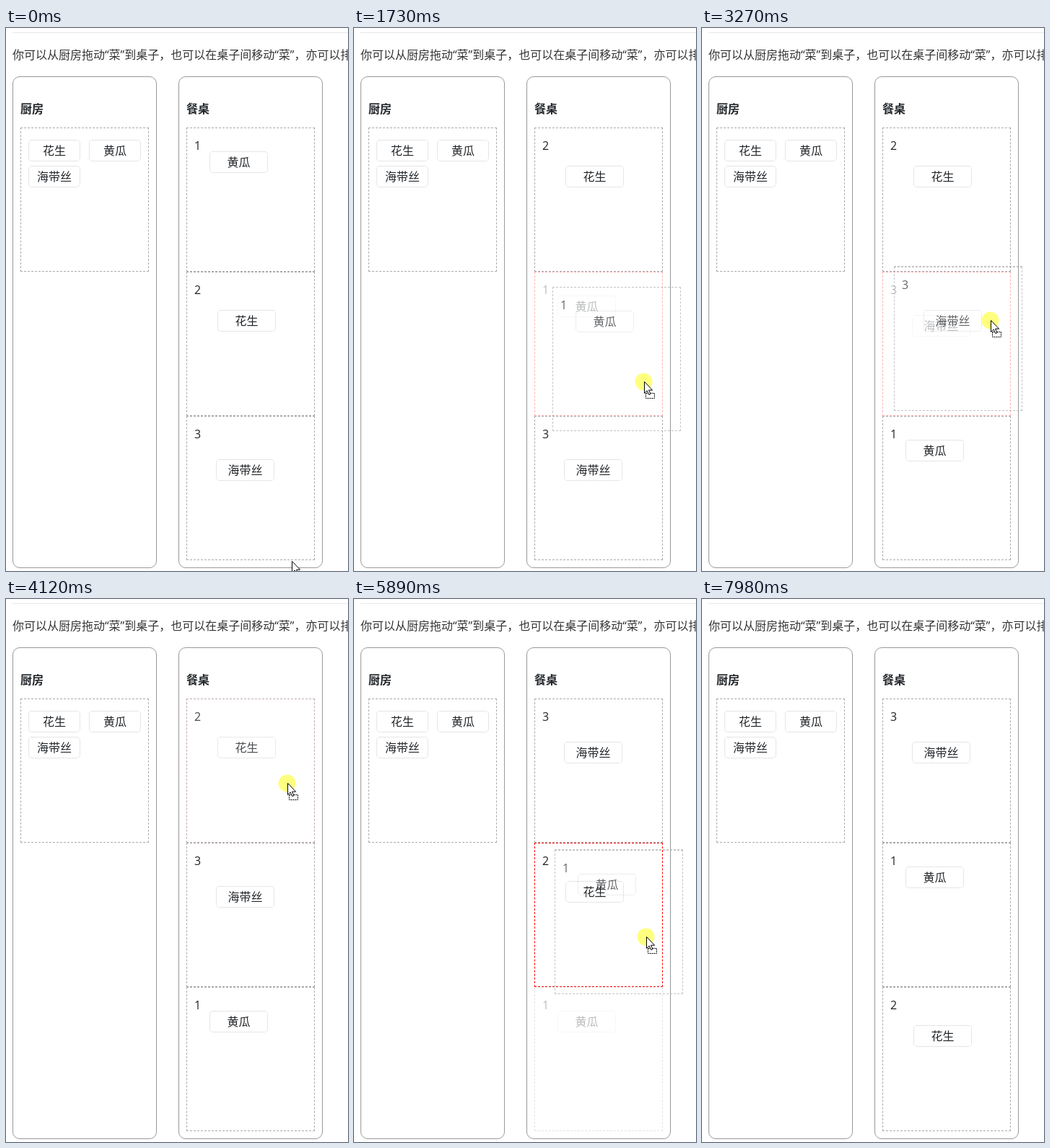
An HTML page that plays this animation: 474 by 753 pixels, repeating every 8.44 s.

```html
<!DOCTYPE html>
<html lang="zh-CN">
<head>
<meta charset="utf-8">
<style>
  html, body { margin: 0; width: 100%; height: 100%; overflow: hidden; background: #fff; }
  body { position: relative; font: 16px/24px "Open Sans", "Noto Sans CJK SC", sans-serif; color: #212529; white-space: nowrap; }
  body * { box-sizing: border-box; }
  div, svg { position: absolute; }
  .rule { left: 9px; right: 0; top: 6px; height: 1px; background: #e8e8e8; }
  .intro { left: 9px; top: 25px; color: #333; }
  .panel { top: 67px; width: 200px; height: 682px; border: 1px solid #999; border-radius: 10px; }
  .panel b { position: absolute; left: 10px; top: 32px; }
  .slot { width: 178px; height: 200px; border: 1px dashed #aaa; }
  .slot span { position: absolute; left: 10px; top: 12px; }
  .dish { width: 81px; height: 30px; line-height: 28px; border: 1px dotted #ccc; border-radius: 5px; text-align: center; }
  .kitchen .dish { width: 72px; }
  .hover { border-color: #f00; }
  .source { opacity: .3; }
  #tables > div, #ghost, #cursor { left: 0; top: 0; }
  #ghost { opacity: .7; }
  /* A lower table also picks up the bottom edge of the table above it */
  #ghost.lower::before { content: ""; position: absolute; inset: -2px -1px auto; border-top: 1px dashed #aaa; }
  #cursor { overflow: visible; }
</style>
</head>
<body>
<div class="rule"></div>
<div class="intro">你可以从厨房拖动“菜”到桌子，也可以在桌子间移动“菜”，亦可以排序</div>
<div class="panel" style="left:9px"><b>厨房</b></div>
<div class="panel" style="left:239px"><b>餐桌</b></div>
<div class="slot kitchen" style="left:20px;top:138px">
  <div class="dish" style="left:10px;top:16px">花生</div>
  <div class="dish" style="left:94px;top:16px">黄瓜</div>
  <div class="dish" style="left:10px;top:52px">海带丝</div>
</div>
<div id="tables">
  <div><span>1</span><div class="dish" style="left:31px;top:32px">黄瓜</div></div>
  <div><span>2</span><div class="dish" style="left:42px;top:52px">花生</div></div>
  <div><span>3</span><div class="dish" style="left:40px;top:59px">海带丝</div></div>
</div>
<div id="ghost"></div>
<svg id="cursor" width="20" height="26">
  <circle id="press" cx="-.5" cy=".5" r="12" fill="#ff0" fill-opacity=".5"/>
  <rect id="parcel" x="2.5" y="16.5" width="12" height="7" fill="#fff" stroke="#000" stroke-dasharray="2 1"/>
  <path d="M.5 .5V16.5L4.2 13L6.8 18.6L9 17.6L6.5 12.2H11.6Z" fill="#fff" stroke="#000"/>
</svg>
<script>
const LOOP = 8440, HIDE_AT = 7980;
const LEFT = 250, TOP = 138, SLOT = 200, MIDDLE = TOP + SLOT * 1.5;
const HOLD = 150, MAX_TRAVEL = 420;

const stop = (time, x, y) => ({ time, x, y });

// Each drag carries a table from an outer slot into the middle one
const drags = [
  { from: 0, grab: stop(580, 377, 269), carry: [stop(1190, 402, 490)], drop: 1880 },
  { from: 2, grab: stop(2340, 384, 612), carry: [stop(3040, 400, 405)], drop: 3420 },
  { from: 0, grab: stop(3970, 390, 255), carry: [stop(4570, 399, 465)], drop: 4970 },
  { from: 2, grab: stop(5430, 377, 658),
    carry: [stop(5890, 405, 468), stop(6750, 400, 440), stop(7050, 398, 388)], drop: 7440 }
];
const route = [stop(0, 396, 739), ...drags.flatMap(d => [d.grab, ...d.carry]), stop(7900, 345, 727)];

const byId = id => document.getElementById(id);
const ghost = byId('ghost'), cursor = byId('cursor'), tables = [...byId('tables').children];

const easeOut = p => p * (2 - p);
const show = (el, on) => { el.style.display = on ? '' : 'none'; };
const place = (el, x, y) => { el.style.transform = `translate(${Math.round(x)}px,${Math.round(y)}px)`; };

function pointerAt(t) {
  const next = route.findIndex(s => s.time > t);
  if (next < 0) return route.at(-1);
  const a = route[next - 1], b = route[next];
  const leave = Math.max(a.time + HOLD, b.time - MAX_TRAVEL);
  const p = easeOut(Math.max(0, (t - leave) / (b.time - leave)));
  return { x: a.x + (b.x - a.x) * p, y: a.y + (b.y - a.y) * p };
}

function render(t) {
  const pointer = pointerAt(t);
  const order = [0, 1, 2];
  let active = null, dragged = -1;

  for (const drag of drags) {
    if (t < drag.grab.time + HOLD) break;
    const { y } = pointerAt(Math.min(t, drag.drop));
    const table = order[drag.from];
    if (drag.from === 0 ? y > MIDDLE : y < MIDDLE) {
      order[drag.from] = order[1];
      order[1] = table;
    }
    if (t < drag.drop) {
      active = drag;
      dragged = table;
    }
  }

  const hovered = active ? Math.floor((pointer.y - TOP) / SLOT) : -1;
  order.forEach((table, slot) => {
    const el = tables[table];
    el.className = 'slot' + (slot === hovered ? ' hover' : '') + (table === dragged ? ' source' : '');
    place(el, LEFT, TOP + slot * SLOT);
  });

  show(ghost, active);
  if (active) {
    const { from, grab } = active;
    ghost.className = from ? 'slot lower' : 'slot';
    ghost.innerHTML = tables[dragged].innerHTML;
    place(ghost, LEFT + pointer.x - grab.x, TOP + from * SLOT + pointer.y - grab.y);
  }

  show(cursor, t < HIDE_AT);
  show(byId('parcel'), active);
  show(byId('press'), drags.some(d => t >= d.grab.time && t < d.drop));
  place(cursor, pointer.x, pointer.y);
}

const origin = performance.now();
function frame() {
  render((performance.now() - origin) % LOOP);
  requestAnimationFrame(frame);
}
frame();
</script>
</body>
</html>
```
